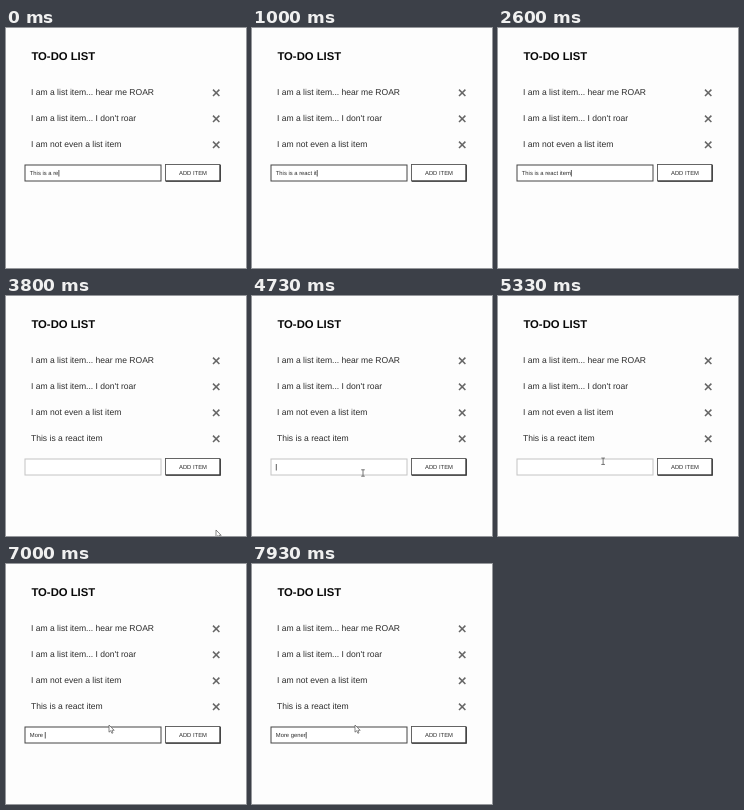
Write an HTML page that moves like this. It is 240 px wide and 240 px high and loops after 8 s.

```html
<!DOCTYPE html>
<html lang="en">
<head>
<meta charset="utf-8">
<title>To-do list</title>
<style>
  html, body { margin: 0; width: 100%; height: 100%; overflow: hidden; background: #fdfdfd; }
  svg { display: block; width: 100%; height: 100%; }
  text { font-family: "Liberation Sans", Arial, sans-serif; fill: #2c2c2c; text-rendering: geometricPrecision; white-space: pre; }
  .title { font-size: 11.3px; font-weight: bold; fill: #080808; }
  .item { font-size: 8.55px; }
  .small { font-size: 5.85px; }
  .cross { stroke: #666; stroke-width: 1.5; }
</style>
</head>
<body>
<svg viewBox="0 0 240 240">
  <text class="title" x="25.4" y="32">TO-DO LIST</text>
  <g id="list"></g>
  <g id="form">
    <rect id="field" x="19" y="137" width="136" height="16" fill="#fff"/>
    <text id="typed" class="small" x="23.8" y="147"></text>
    <path id="caret" d="M0 142v6.5" stroke="#333" stroke-width=".8"/>
    <rect x="159.5" y="136.5" width="54.5" height="16.5" fill="#fff" stroke="#555" stroke-width=".9"/>
    <path d="M160 153.2H214.2V137" fill="none" stroke="#333" stroke-width="1.3"/>
    <text class="small" x="173" y="147">ADD ITEM</text>
  </g>
  <path id="arrow" d="M0 0V7.2L1.7 5.7L2.9 8.3L4 7.8L2.9 5.3H5.2Z" fill="#fff" stroke="#555" stroke-width=".7"/>
  <path id="beam" d="M-1.8-3.2H1.8M0-3.2V3.2M-1.8 3.2H1.8" fill="none" stroke="#555" stroke-width=".8"/>
</svg>
<script>
const LOOP = 8000, ROW = 26, SUBMIT = 3000, FOCUS = 4500;
const first = "This is a react item", second = "More gener";
const $ = id => document.getElementById(id);

$("list").innerHTML = [
  "I am a list item... hear me ROAR",
  "I am a list item... I don't roar",
  "I am not even a list item",
  first
].map((label, i) => `<g transform="translate(0 ${i * ROW})">
  <text class="item" x="25" y="67.3">${label}</text>
  <path class="cross" d="M207 61.6L213.4 68M213.4 61.6L207 68"/></g>`).join("");
const added = $("list").lastElementChild;

// Pointer stops: time, x, y
const stops = [[3670, 214, 241], [3800, 210, 234], [4450, 111, 177], [5000, 111, 177], [5500, 103, 161]];

const clamp = (v, lo, hi) => Math.max(lo, Math.min(hi, v));
const show = (el, on) => el.setAttribute("visibility", on ? "visible" : "hidden");

function pointerAt(t) {
  let i = 0;
  while (i < stops.length - 2 && t > stops[i + 1][0]) i++;
  const [a, b] = [stops[i], stops[i + 1]];
  const p = clamp((t - a[0]) / (b[0] - a[0]), 0, 1);
  const e = p * p * (3 - 2 * p);
  return [a[1] + (b[1] - a[1]) * e, a[2] + (b[2] - a[2]) * e];
}

// Typed text and the moment of the last edit
function inputAt(t) {
  if (t < SUBMIT) {
    const n = clamp(12 + Math.floor(t / 165), 12, first.length);
    return [first.slice(0, n), Math.min(t, 1320)];
  }
  if (t < 5930) return ["", t < FOCUS ? SUBMIT : FOCUS];
  const n = clamp(1 + Math.floor((t - 5930) / 215), 1, second.length);
  return [second.slice(0, n), t];
}

function draw(t) {
  const submitted = t >= SUBMIT;
  const [value, edited] = inputAt(t);
  show(added, submitted);
  $("form").setAttribute("transform", `translate(0 ${submitted ? ROW : 0})`);
  $("typed").textContent = value;
  $("field").setAttribute("stroke", value ? "#444" : "#c4c4c4");

  const width = value ? $("typed").getComputedTextLength() : 0;
  $("caret").setAttribute("transform", `translate(${24.3 + width} 0)`);
  show($("caret"), (t - edited) % 1060 < 530);

  const [x, y] = pointerAt(t);
  const visible = t >= stops[0][0];
  const overField = x > 19 && x < 155 && y > 163 && y < 179;
  for (const [id, on] of [["arrow", !overField], ["beam", overField]]) {
    $(id).setAttribute("transform", `translate(${x} ${y})`);
    show($(id), visible && on);
  }
}

const start = performance.now();
function tick() {
  draw((performance.now() - start) % LOOP);
  requestAnimationFrame(tick);
}
tick();
</script>
</body>
</html>
```
